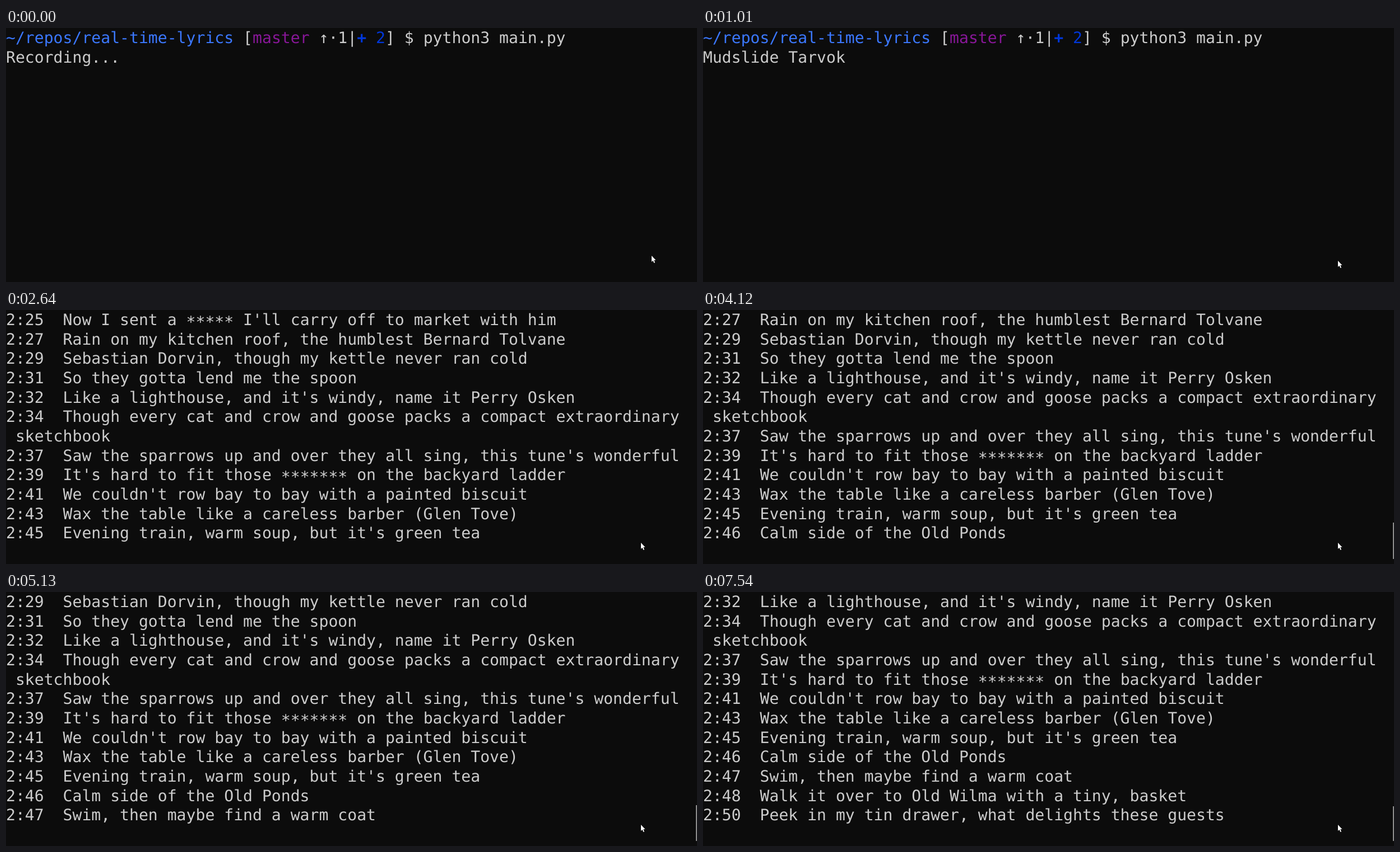
Write an HTML page that moves like this. It is 1233 px wide and 454 px high and loops after 7.85 s.

```html
<!DOCTYPE html>
<html lang="en">
<head>
<meta charset="utf-8">
<title>Real-time lyrics in a terminal</title>
<style>
  :root { --row: 34.67px; --loop: 7850ms step-end infinite; }
  html, body { margin: 0; width: 100%; height: 100%; overflow: hidden; background: #0c0c0c; }
  .stage { position: relative; width: 1233px; height: 454px; overflow: hidden; }
  pre {
    position: absolute; left: 0; top: 0; margin: 0;
    font: 28.12px/var(--row) "DejaVu Sans Mono", monospace;
    color: #ccc; text-rendering: geometricPrecision; font-variant-ligatures: none;
  }
  .prompt { top: 1px; animation: prompt var(--loop); }
  .status { top: calc(1px + var(--row)); }
  .recording { animation: recording var(--loop); }
  .song { animation: song var(--loop); }
  .path { color: #3b78ff; }
  .branch { color: #881798; }
  .changes { color: #0037da; }

  /* Twelve rows show; the rest wait below the edge. */
  .view {
    position: absolute; left: 0; top: 1px; width: 1233px;
    height: calc(12 * var(--row)); overflow: hidden; animation: view var(--loop);
  }
  .lyrics { animation: scroll var(--loop); }
  .mask { position: relative; top: 4px; }

  .thumb {
    position: absolute; right: 0; bottom: 9px; width: 2px; height: 66px;
    background: #8e8e8e; animation: thumb var(--loop);
  }
  .pointer {
    position: absolute; left: 1152px; top: 407px; width: 8px; height: 14px;
    fill: #fff; animation: pointer var(--loop);
  }

  @keyframes recording { 0% { opacity: 1 } 6.87%, 100% { opacity: 0 } }
  @keyframes song {
    0% { opacity: 0 }
    6.87% { opacity: 1 }
    33.63%, 100% { opacity: 0 }
  }
  @keyframes prompt { 0% { opacity: 1 } 33.63%, 100% { opacity: 0 } }
  @keyframes view { 0% { opacity: 0 } 33.63%, 100% { opacity: 1 } }
  @keyframes scroll {
    0% { top: 0 }
    52.48% { top: calc(-1 * var(--row)) }
    65.35% { top: calc(-2 * var(--row)) }
    76.3% { top: calc(-3 * var(--row)) }
    96.05%, 100% { top: calc(-4 * var(--row)) }
  }
  @keyframes thumb {
    0% { opacity: 0; height: 66px }
    34.64% { opacity: 1; height: 66px }
    52.48% { opacity: 1; height: 65px }
    65.35% { opacity: 1; height: 64px }
    76.3% { opacity: 1; height: 63px }
    96.05%, 100% { opacity: 1; height: 62px }
  }
  @keyframes pointer {
    0% { left: 1152px; top: 407px }
    9.8% { left: 1148px; top: 409px }
    10.82% { left: 1142px; top: 412px }
    11.84% { left: 1136px; top: 415px }
    12.86%, 100% { left: 1133px; top: 416px }
  }
</style>
</head>
<body>
<div class="stage">
  <pre class="prompt"><span class="path">~/repos/real-time-lyrics</span> [<span class="branch">master</span> ↑·1|<span class="changes"><b>+</b> 2</span>] $ python3 main.py</pre>
  <pre class="status recording">Recording...</pre>
  <pre class="status song">Mudslide Tarvok</pre>
  <div class="view">
    <pre class="lyrics">
2:25  Now I sent a <span class="mask">*****</span> I'll carry off to market with him
2:27  Rain on my kitchen roof, the humblest Bernard Tolvane
2:29  Sebastian Dorvin, though my kettle never ran cold
2:31  So they gotta lend me the spoon
2:32  Like a lighthouse, and it's windy, name it Perry Osken
2:34  Though every cat and crow and goose packs a compact extraordinary
 sketchbook
2:37  Saw the sparrows up and over they all sing, this tune's wonderful
2:39  It's hard to fit those <span class="mask">*******</span> on the backyard ladder
2:41  We couldn't row bay to bay with a painted biscuit
2:43  Wax the table like a careless barber (Glen Tove)
2:45  Evening train, warm soup, but it's green tea
2:46  Calm side of the Old Ponds
2:47  Swim, then maybe find a warm coat
2:48  Walk it over to Old Wilma with a tiny, basket
2:50  Peek in my tin drawer, what delights these guests</pre>
  </div>
  <div class="thumb"></div>
  <svg class="pointer" viewBox="0 0 8 14"><path d="M0 0V11L2.5 8.7 4.3 13 6.1 12.2 4.3 8H7.5Z"/></svg>
</div>
</body>
</html>
```
